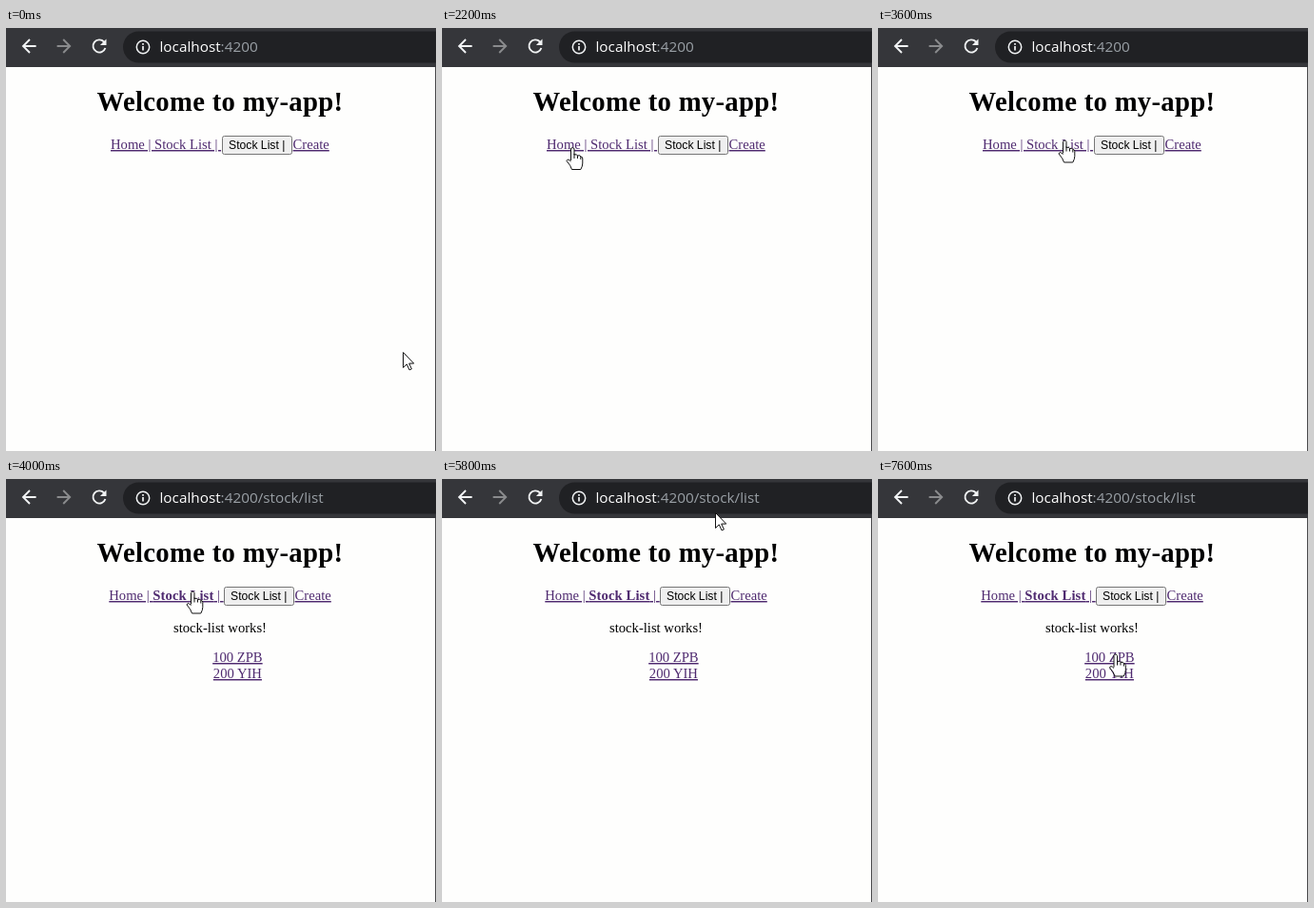
Animation of 452 by 444 pixels, one loop 8 s. Source, as an HTML page:

```html
<!DOCTYPE html>
<html lang="en">
<head>
<meta charset="utf-8">
<title>Router links</title>
<style>
  html, body { margin: 0; width: 100%; height: 100%; overflow: hidden; background: #fefefd; }
  svg { display: block; }
  text { font: 14.65px "Liberation Serif", "Times New Roman", serif; white-space: pre; }
  .title { font-size: 28.7px; font-weight: bold; letter-spacing: .3px; }
  .mid { text-anchor: middle; }
  .link { fill: #4f2a70; text-decoration: underline 1px; text-underline-offset: 1px; text-decoration-skip-ink: none; }
  .bold { font-weight: bold; letter-spacing: .1px; }
  .button { font: 12.2px "Liberation Sans", Arial, sans-serif; }
  .url { font: 15.3px "Open Sans", "Noto Sans", sans-serif; fill: #fff; }
  .url tspan { fill: #9aa0a6; }
  .icon { fill: none; stroke: #f1f3f4; stroke-width: 1.9; }
  .cursor { fill: #fff; stroke: #111; stroke-linejoin: round; }
</style>
</head>
<body>
<svg width="452" height="444" viewBox="0 0 452 444">
  <rect width="452" height="41" fill="#35363a"/>
  <rect id="field" x="123" y="3.5" width="360" height="33" rx="16.5"/>
  <g class="icon">
    <path id="back" d="M31.6 19H18M25 12l-7 7 7 7"/>
    <use href="#back" transform="translate(85.2) scale(-1 1)" opacity=".45"/>
    <path d="M103 14.5A6.6 6.6 0 1 0 104.4 21"/>
    <path d="M105.5 11.5v6.6h-6.6z" fill="#f1f3f4" stroke="none"/>
    <circle cx="144" cy="20" r="6.7" stroke-width="1.5"/>
    <path d="M144 16v1.7M144 19v4.6" stroke-width="1.7"/>
  </g>
  <text class="url" x="161.5" y="25">localhost<tspan>:4200<tspan id="route">/stock/list</tspan></tspan></text>
  <rect x="451" y="41" width="1" height="403" fill="#4a4a4c"/>

  <text class="title mid" x="225" y="87">Welcome to my-app!</text>
  <g id="home"></g>
  <g id="list">
    <text class="mid" x="225" y="161">stock-list works!</text>
    <text class="link mid" x="243.4" y="192">100 ZPB</text>
    <text class="link mid" x="243.4" y="209">200 YIH</text>
  </g>

  <g id="cursor" class="cursor">
    <path id="arrow" d="M.5 .5v16l3.8-3.6 2.7 6 2.4-1-2.7-5.8h5z"/>
    <path id="hand" d="M-2 14V2a1.8 1.8 0 0 1 3.5 0V8q3-1 3.5 1 3-1 3.3 1 2 0 2 2v5q0 3-2 6.5H-1q-1-4-5.5-9 1-3 4.5 .5M1.5 7v5M5 9v3M8.3 10v3"/>
    <path id="beam" fill="none" stroke="#fff" d="M-3 -7.5H4M-3 7.5H4M.5 -7.5v15"/>
  </g>
</svg>
<script>
const LOOP = 8000, STEP = 200, NAVIGATED = 3800;
const $ = id => document.getElementById(id);

// The pointer rests between moves
const rest = { x: 417, y: 340 };
const moves = [
  { from: 800, to: 1800, x: 137, y: 130 },
  { from: 2000, to: 2200, x: 137.5, y: 125 },
  { from: 2200, to: 3000, x: 207, y: 108 },
  { from: 3200, to: 3600, x: 196.5, y: 117.5 },
  { from: 5000, to: 5800, x: 287, y: 35 },
  { from: 5800, to: 6200, x: 326, y: 23 },
  { from: 6600, to: 7600, x: 250, y: 183.5 }
];

function nav(left, button, active) {
  const stock = active ? '<tspan class="bold">Stock List</tspan>' : 'Stock List';
  return `<text class="link" x="${left}" y="127">Home | ${stock} | </text>
    <rect x="${button + .5}" y="113.5" width="73" height="19" rx="2" fill="#efefef" stroke="#767676"/>
    <text class="button" x="${button + 7}" y="127">Stock List |</text>
    <text class="link" x="${button + 74.6}" y="127">Create</text>`;
}

function pointAt(t) {
  let { x, y } = rest;
  for (const move of moves) {
    const k = Math.min(1, Math.max(0, (t - move.from) / (move.to - move.from)));
    const ease = k * k * (3 - 2 * k);
    x += (move.x - x) * ease;
    y += (move.y - y) * ease;
  }
  return [x, y];
}

function pointerKind(x, y, onList) {
  const inside = (l, t, r, b) => x >= l && x < r && y >= t && y < b;
  if (inside(155, 3, 452, 32)) return 'beam';
  if (inside(108, 115, 227, 130) || onList && inside(217, 180, 270, 212)) return 'hand';
  return 'arrow';
}

function show(id, on) {
  $(id).style.display = on ? '' : 'none';
}

function draw(time) {
  const t = Math.floor(time % LOOP / STEP) * STEP;
  const onList = t >= NAVIGATED;
  const [x, y] = pointAt(t);
  const kind = pointerKind(x, y, onList);
  show('home', !onList);
  show('list', onList);
  show('route', onList);
  for (const id of ['arrow', 'hand', 'beam']) show(id, id === kind);
  $('cursor').setAttribute('transform', `translate(${x} ${y})`);
  $('field').setAttribute('fill', kind === 'beam' ? '#292a2d' : '#202124');
}

$('home').innerHTML = nav(110, 227, false);
$('list').insertAdjacentHTML('afterbegin', nav(108.3, 229, true));
const start = performance.now();
function tick() {
  draw(performance.now() - start);
  requestAnimationFrame(tick);
}
tick();
</script>
</body>
</html>
```
